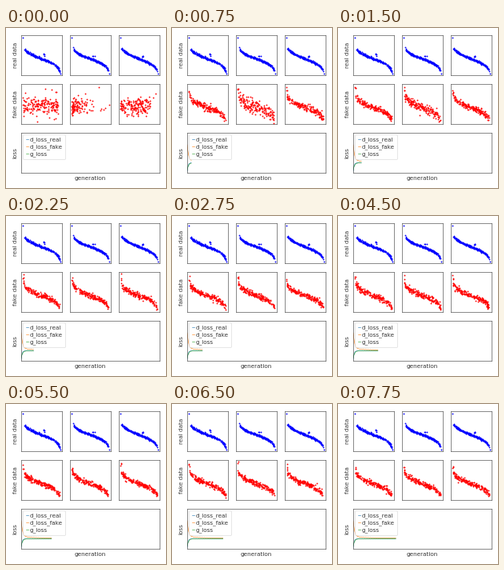
Recreate the animation shown at these times as a matplotlib script. Size 200 by 200 pixels, loop 8 s.

```python
import numpy as np
import matplotlib.pyplot as plt
from matplotlib.animation import FuncAnimation

SIZE, DPI = 200, 100
FRAMES, INTERVAL = 32, 250
LEFT, TOP, STEP, PANEL = 19, 9, 61, 50.6
FONT = 7.25 * 72 / DPI
LINE = 0.42
INK = "#3a3a3a"

plt.rcParams["font.family"] = "DejaVu Sans"
fig = plt.figure(figsize=(SIZE / DPI, SIZE / DPI), dpi=DPI, facecolor="white")


def make_axes(row, col, width=PANEL):
    """Axes whose data units are pixels, with y pointing down."""
    left, top, height = LEFT + STEP * col, TOP + STEP * row, 50
    ax = fig.add_axes([left / SIZE, 1 - (top + height) / SIZE,
                       width / SIZE, height / SIZE])
    ax.set(xlim=(0, width), ylim=(height, 0), xticks=[], yticks=[])
    for spine in ax.spines.values():
        spine.set(linewidth=LINE, edgecolor=INK)
    return ax


def dots(ax, points, color):
    return ax.scatter(*points.T, s=1.7, color=color, linewidths=0)


def trend(x):
    """Logit curve: steep at both ends, gentle in the middle."""
    t = (x - 1) / 48.5
    return 29.3 + 4.6 * np.log(t / (1 - t))


def real_points(col):
    rng = np.random.default_rng(40 + col)
    x = rng.uniform(3, 48, 200)
    y = trend(x) + rng.normal(0, 0.6, x.size)
    cluster = rng.normal((29, 27 - 3 * (col == 0)), 1.3, (4, 2))
    return np.vstack([np.column_stack([x, y]), cluster, [(2.3, 2.5), (48.5, 47.5)]])


def blob_points(col, rng):
    """Shapeless cloud seen before any training."""
    if col == 1:
        x = 2 + rng.exponential(8, 110)
    else:
        x = rng.uniform(2, 46 - 3 * col, 170)
    y = rng.normal(27.5, 5.5, x.size)
    strays = rng.uniform(3, 47, (6, 2))
    return np.vstack([np.column_stack([x, y]), strays])


def fake_points(col, frame):
    rng = np.random.default_rng(1000 * col + frame)
    if frame == 0:
        return blob_points(col, rng)
    x = rng.uniform(2.8, 47.8, 180)
    fit = 1 - 0.4 ** frame
    slack = max(0, 1 - frame / 8)
    spread = 1.7 + (4.5 if col == 1 else 0.6) * slack
    y = 28 + fit * (trend(x) - 28) + rng.normal(0, spread, x.size)
    tips = rng.normal((2.6, 8), (0.4, 3), (3, 2))
    points = np.vstack([np.column_stack([x, y]), tips])
    return np.clip(points, 1.5, 48.5)


fakes = []
for col in range(3):
    dots(make_axes(0, col), real_points(col), "blue")
    fakes.append(dots(make_axes(1, col), fake_points(col, 0), "red"))

loss_ax = make_axes(2, 0, 2 * STEP + PANEL)
LABELS = ("d_loss_real", "d_loss_fake", "g_loss")
lines = [loss_ax.plot([], [], lw=LINE, label=label)[0] for label in LABELS]
legend = loss_ax.legend(
    loc="upper left", fontsize=FONT, labelcolor=INK, handlelength=0.5,
    handletextpad=0.2, borderpad=0.43, labelspacing=0.27, borderaxespad=0.33)
legend.get_frame().set_linewidth(LINE)

# Loss histories in pixels, sampled finely over the whole run
steps = np.linspace(0, 53.5, 400)
wobble = 0.15 * np.sin(2.1 * steps)
losses = (37.3 + 11 * np.exp(-steps / 1.2) + wobble,
          36.6 - 20 * np.exp(-steps / 1.8) - 1.6 * np.exp(-steps / 18) - wobble,
          37.4 + 9 * np.exp(-steps / 1.8) - wobble)


def write(x, y, text, rotation=0):
    fig.text(x / SIZE, 1 - y / SIZE, text, size=FONT, rotation=rotation,
             ha="center", va="center", color=INK)


for row, text in enumerate(("real data", "fake data", "loss")):
    write(11.5, TOP + 25.2 + STEP * row, text, 90)
write(105, 188, "generation")


def update(frame):
    for col, scatter in enumerate(fakes):
        scatter.set_offsets(fake_points(col, frame))
    seen = steps <= 1.72 * frame
    for line, loss in zip(lines, losses):
        line.set_data(steps[seen], loss[seen])
    return fakes + lines


anim = FuncAnimation(fig, update, frames=FRAMES, interval=INTERVAL,
                     repeat=True, repeat_delay=0)
plt.show()
```
